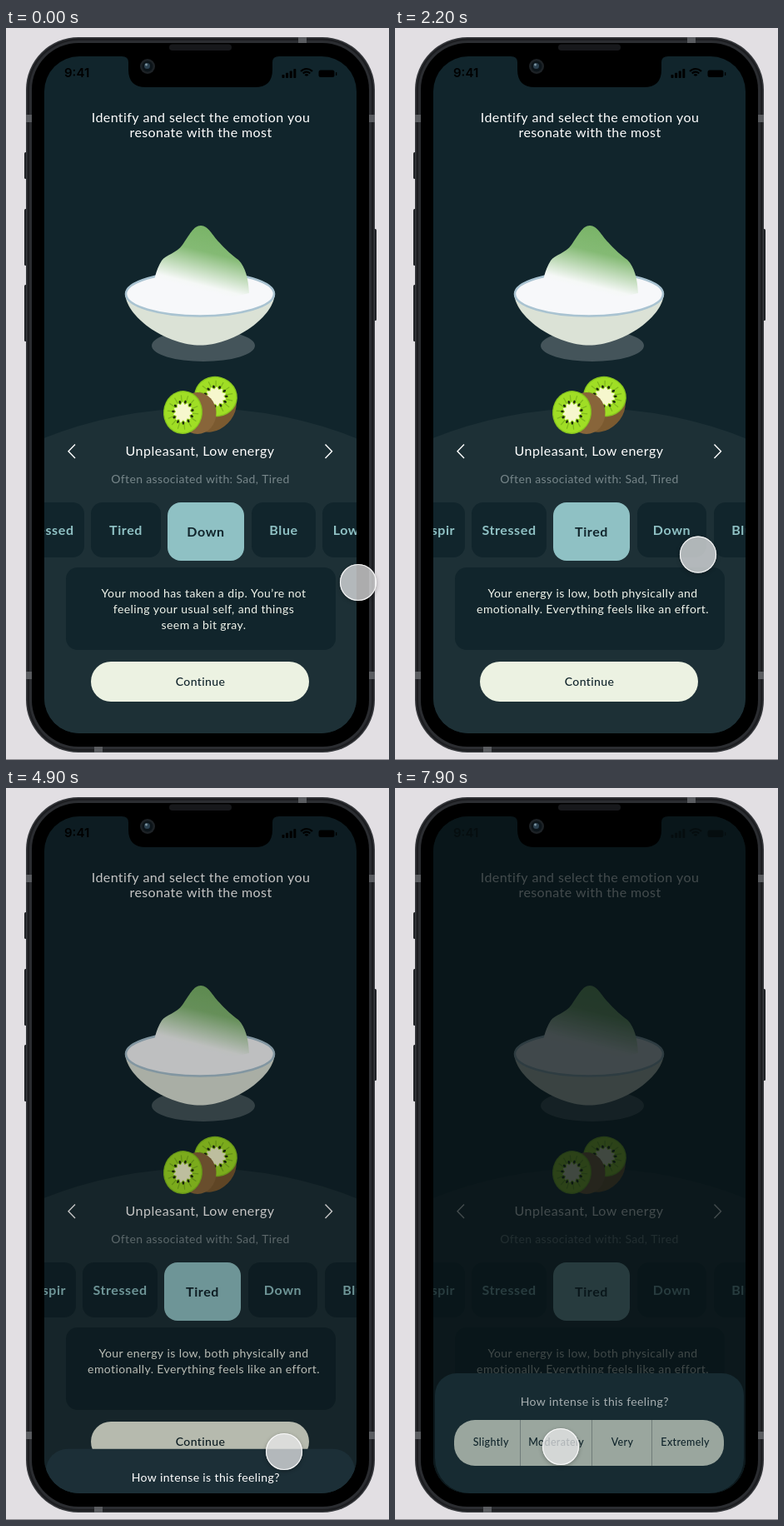
These frames come from a looping animation (460 by 878 pixels, 8000 ms). An HTML page with a canvas:

```html
<!DOCTYPE html>
<html lang="en">
<head>
<meta charset="utf-8">
<title>Emotion picker</title>
<style>
  html, body { margin: 0; width: 460px; height: 878px; overflow: hidden; background: #e2dfe3; }
  canvas { display: block; width: 460px; height: 878px; }
</style>
</head>
<body>
<canvas id="stage"></canvas>
<script>
const W = 460, H = 878, LOOP = 8000, STEP = 100;
const canvas = document.getElementById('stage');
const ctx = canvas.getContext('2d');
const dpr = window.devicePixelRatio || 1;
canvas.width = W * dpr;
canvas.height = H * dpr;

const DARK = [17, 37, 44], TEAL = [143, 193, 196], MIST = [163, 178, 181];
const CREAM = '#ecf2e2', BASE = '#11252c', PANEL = '#1d3036';
const FONT = 'Lato, "Open Sans", sans-serif';

const clamp = v => Math.max(0, Math.min(1, v));
const span = (t, a, b) => clamp((t - a) / (b - a));
const easeOut = v => 1 - (1 - v) ** 3;
const lerp = (a, b, p) => a + (b - a) * p;
const mix = (a, b, p) => `rgb(${a.map((v, i) => Math.round(lerp(v, b[i], p))).join(',')})`;

function box(x, y, w, h, r, fill) {
  ctx.beginPath();
  ctx.roundRect(x, y, w, h, r);
  ctx.fillStyle = fill;
  ctx.fill();
}

function oval(x, y, rx, ry, fill, turn = 0) {
  ctx.beginPath();
  ctx.ellipse(x, y, rx, ry, turn, 0, Math.PI * 2);
  ctx.fillStyle = fill;
  ctx.fill();
}

function line(points, color, width) {
  ctx.beginPath();
  points.forEach(([x, y]) => ctx.lineTo(x, y));
  ctx.strokeStyle = color;
  ctx.lineWidth = width;
  ctx.stroke();
}

function text(str, x, y, size, color, { weight = 400, gap = 0.4, align = 'center', font = FONT } = {}) {
  ctx.font = `${weight} ${size}px ${font}`;
  ctx.letterSpacing = gap + 'px';
  ctx.textAlign = align;
  ctx.fillStyle = color;
  ctx.fillText(str, x, y);
}

function phoneBody() {
  ctx.fillStyle = '#e2dfe3';
  ctx.fillRect(0, 0, W, H);
  ctx.fillStyle = '#8d8b90';
  ctx.fillRect(0, 877, W, 1);
  [[149, 32], [217, 68], [308, 68]].forEach(([y, h]) => box(22, y, 5, h, 1.5, '#202226'));
  box(440, 241, 5, 110, 1.5, '#202226');
  box(24, 11, 419, 858, 63, '#36383c');
  box(25.5, 12.5, 416, 855, 61.5, '#1c1d20');
  box(28, 15, 411, 850, 59, '#2b2d31');
  const band = '#5a5c60';
  [[24, 104, 7, 9], [436, 104, 7, 9], [24, 772, 7, 9], [436, 772, 7, 9], [351, 11, 10, 7], [106, 862, 10, 7]]
    .forEach(b => { ctx.fillStyle = band; ctx.fillRect(...b); });
  box(31, 18, 405, 844, 56, '#000');
}

function notch() {
  ctx.beginPath();
  ctx.moveTo(139, 33);
  ctx.lineTo(139, 34);
  ctx.quadraticCurveTo(147, 34, 147, 41);
  ctx.lineTo(147, 50);
  ctx.quadraticCurveTo(147, 71, 168, 71);
  ctx.lineTo(299, 71);
  ctx.quadraticCurveTo(320, 71, 320, 50);
  ctx.lineTo(320, 41);
  ctx.quadraticCurveTo(320, 34, 328, 34);
  ctx.lineTo(328, 33);
  ctx.fillStyle = '#000';
  ctx.fill();
  box(196, 19.5, 75, 7.5, 4, '#17181b');
  oval(170, 46, 9, 9, '#1d2226');
  oval(170, 46, 6.5, 6.5, '#0c1419');
  oval(169.5, 45.5, 3.5, 3.5, '#2c4150');
  oval(168.5, 44, 1.4, 1.4, '#8096a1');
}

function statusBar() {
  text('9:41', 70, 59, 15, '#000', { weight: 600, gap: 0, align: 'left', font: 'Inter, sans-serif' });
  for (let i = 0; i < 4; i++) box(331.5 + i * 4.6, 56 - i * 2.3, 3, 4 + i * 2.3, 0.8, '#000');
  ctx.lineWidth = 2.2;
  ctx.strokeStyle = '#000';
  [9.5, 5.8, 2.2].forEach(r => {
    ctx.beginPath();
    ctx.arc(361, 58.5, r, -Math.PI * 0.76, -Math.PI * 0.24);
    ctx.stroke();
  });
  box(375.5, 50.5, 19, 8.5, 2.5, '#000');
  box(396, 53, 1.3, 4, 0.6, '#000');
}

function bowl() {
  oval(237, 381, 62, 19, '#44545a');
  ctx.beginPath();
  ctx.moveTo(143, 319);
  ctx.bezierCurveTo(146, 350, 196, 380.5, 233, 380.5);
  ctx.bezierCurveTo(270, 380.5, 320, 350, 323, 319);
  ctx.fillStyle = '#dbe2d6';
  ctx.fill();
  oval(233, 319, 89, 26.5, '#f7f8fa');
  ctx.strokeStyle = '#a9c3d1';
  ctx.lineWidth = 2.6;
  ctx.stroke();

  const ice = ctx.createLinearGradient(243, 240, 225, 312);
  ice.addColorStop(0, '#7ab468');
  ice.addColorStop(0.38, '#84ba74');
  ice.addColorStop(0.92, '#f5f8f6');
  ice.addColorStop(1, '#f7f8fa');
  ctx.beginPath();
  ctx.moveTo(177, 318);
  ctx.bezierCurveTo(177, 303, 180, 290, 187, 279);
  ctx.bezierCurveTo(192, 272, 205, 270, 212, 260);
  ctx.bezierCurveTo(220, 249, 225, 237, 234, 237);
  ctx.bezierCurveTo(243, 237, 248, 249, 256, 257);
  ctx.bezierCurveTo(263, 265, 272, 273, 279, 278);
  ctx.bezierCurveTo(288, 287, 291, 301, 292, 318);
  ctx.quadraticCurveTo(235, 334, 177, 318);
  ctx.fillStyle = ice;
  ctx.fill();
}

function slice(x, y, rx, ry, turn) {
  ctx.save();
  ctx.translate(x, y);
  ctx.rotate(turn);
  ctx.scale(rx / 25, ry / 25);
  oval(0, 0, 25, 25, '#86c41f');
  oval(0, 0, 23.6, 23.6, '#a0de25');
  for (let i = 0; i < 14; i++) {
    const a = i * Math.PI / 7, c = Math.cos(a), s = Math.sin(a);
    line([[c * 12, s * 12], [c * 20, s * 20]], '#7fb91c', 1.3);
  }
  ctx.beginPath();
  for (let i = 0; i < 22; i++) {
    const a = i * Math.PI / 11, r = i % 2 ? 9 : 12.5;
    ctx.lineTo(Math.cos(a) * r, Math.sin(a) * r);
  }
  ctx.fillStyle = '#f6f7cd';
  ctx.fill();
  for (let i = 0; i < 11; i++) {
    const a = (i + 0.5) * Math.PI * 2 / 11;
    oval(Math.cos(a) * 12.3, Math.sin(a) * 12.3, 1.9, 1.4, '#1d2a0c', a);
  }
  ctx.restore();
}

function kiwi() {
  oval(250, 458, 30, 23, '#7b5a30', -Math.PI / 4);
  slice(252, 442, 26, 24, 0.25);
  oval(230, 462, 22.5, 25, '#88653a');
  slice(212.5, 461, 23.5, 26, 0.1);
}

// name, width, left edge before and after the swipe
const CARDS = [
  ['Despir', 74, -78, 10],
  ['Stressed', 90, 4, 92],
  ['Tired', 84, 102, 190],
  ['Down', 83, 194, 291],
  ['Blue', 77, 295, 383],
  ['Low', 57, 380, 468]
];

function cards(p) {
  const lit = p > 0 && p < 1 ? MIST : TEAL;
  for (const [name, w, from, to] of CARDS) {
    const on = name === 'Tired' ? p : name === 'Down' ? 1 - p : 0;
    const x = lerp(from, to, p), cw = lerp(w, 92, on);
    box(x, 569, cw, 66 + 4 * on, 14 + 2 * on, mix(DARK, lit, on));
    text(name, x + cw / 2, 607.5 + 2.3 * on, 16, mix(TEAL, DARK, on), { weight: 700, gap: 0.6 });
  }
}

const NOTES = [
  ['Your mood has taken a dip. You’re not', 'feeling your usual self, and things', 'seem a bit gray.'],
  ['Your energy is low, both physically and', 'emotionally. Everything feels like an effort.']
];

function note(lines, alpha) {
  ctx.globalAlpha = alpha;
  lines.forEach((s, i) => text(s, 237.5, 683 + i * 19, 14, '#f1f5ec'));
  ctx.globalAlpha = 1;
}

function screen(p) {
  ctx.fillStyle = BASE;
  ctx.fillRect(46, 34, 375, 812);
  oval(233, 962, 506, 506, PANEL);
  statusBar();
  text('Identify and select the emotion you', 234, 113, 16, '#fff');
  text('resonate with the most', 234, 131.3, 16, '#fff');
  bowl();
  kiwi();
  line([[83, 499.5], [75, 507.7], [83, 516]], '#fff', 1.4);
  line([[383.5, 499.5], [391.5, 507.7], [383.5, 516]], '#fff', 1.4);
  text('Unpleasant, Low energy', 233, 513, 16, '#fff', { gap: 0.5 });
  text('Often associated with: Sad, Tired', 233.5, 546, 14, '#77868a', { gap: 0.36 });
  cards(p);
  box(72, 647, 324, 99, 14, BASE);
  note(NOTES[0], 1 - p);
  note(NOTES[1], p);
  box(102, 760, 262, 48, 24, CREAM);
  text('Continue', 233.5, 788.8, 14, BASE, { weight: 500 });
}

function sheet(p) {
  if (!p) return;
  ctx.fillStyle = `rgba(0,0,0,${0.62 * p})`;
  ctx.fillRect(46, 34, 375, 812);
  ctx.save();
  ctx.translate(0, 144 * (1 - p));
  box(48, 702, 371, 144, [26, 26, 42, 42], '#1c2f37');
  text('How intense is this feeling?', 239.7, 741, 14, '#fff', { gap: 0.38 });
  box(71, 758, 324, 55, 25, CREAM);
  [150.5, 236.5, 308.5].forEach(x => line([[x, 758], [x, 813]], '#a9b0a9', 1));
  [['Slightly', 115.3], ['Moderately', 193.7], ['Very', 273], ['Extremely', 348.6]]
    .forEach(([s, x]) => text(s, x, 789.3, 12.5, BASE, { weight: 500, gap: 0.35 }));
  ctx.restore();
}

// time, x, y
const PATH = [
  [0, 423, 665], [1100, 250, 607], [1400, 285, 614], [1800, 364, 622], [2300, 364, 634],
  [2800, 352, 692], [3100, 332, 744], [3600, 334, 792], [4400, 334, 796], [5400, 334, 796],
  [5800, 327, 798], [6300, 304, 797], [7200, 199, 790], [8000, 199, 790]
];

function pointer(t) {
  const i = Math.max(1, PATH.findIndex(k => k[0] > t));
  const [t0, x0, y0] = PATH[i - 1], [t1, x1, y1] = PATH[i];
  const p = span(t, t0, t1);
  const x = lerp(x0, x1, p), y = lerp(y0, y1, p);
  const down = (t >= 1100 && t <= 1700) || (t >= 4700 && t <= 4800);
  ctx.save();
  // shadow only outside the disc
  ctx.beginPath();
  ctx.rect(0, 0, W, H);
  ctx.arc(x, y, 22, 0, Math.PI * 2, true);
  ctx.clip();
  ctx.shadowColor = 'rgba(0,0,0,.3)';
  ctx.shadowBlur = 5 * dpr;
  ctx.shadowOffsetY = 1.5 * dpr;
  oval(x, y, 22, 22, '#999');
  ctx.restore();
  oval(x, y, 22, 22, down ? 'rgba(232,236,236,.52)' : 'rgba(233,233,234,.74)');
  ctx.beginPath();
  ctx.arc(x, y, 21.5, 0, Math.PI * 2);
  ctx.strokeStyle = down ? 'rgba(215,240,238,.65)' : 'rgba(255,255,255,.85)';
  ctx.lineWidth = 1.2;
  ctx.stroke();
}

function draw(t) {
  ctx.setTransform(dpr, 0, 0, dpr, 0, 0);
  phoneBody();
  ctx.save();
  ctx.beginPath();
  ctx.roundRect(46, 34, 375, 812, 42);
  ctx.clip();
  screen(t < 1400 ? 0.375 * span(t, 1200, 1400) : lerp(0.375, 1, span(t, 1400, 1700)));
  sheet(easeOut(span(t, 4850, 5200)));
  ctx.fillStyle = `rgba(16,36,43,${span(t, 7800, 8070)})`;
  ctx.fillRect(46, 34, 375, 812);
  ctx.restore();
  notch();
  pointer(t);
}

const start = performance.now();
function tick(now) {
  const t = Math.max(0, now - start) % LOOP;
  draw(Math.floor(t / STEP) * STEP);
  requestAnimationFrame(tick);
}
draw(0);
requestAnimationFrame(tick);
</script>
</body>
</html>
```
